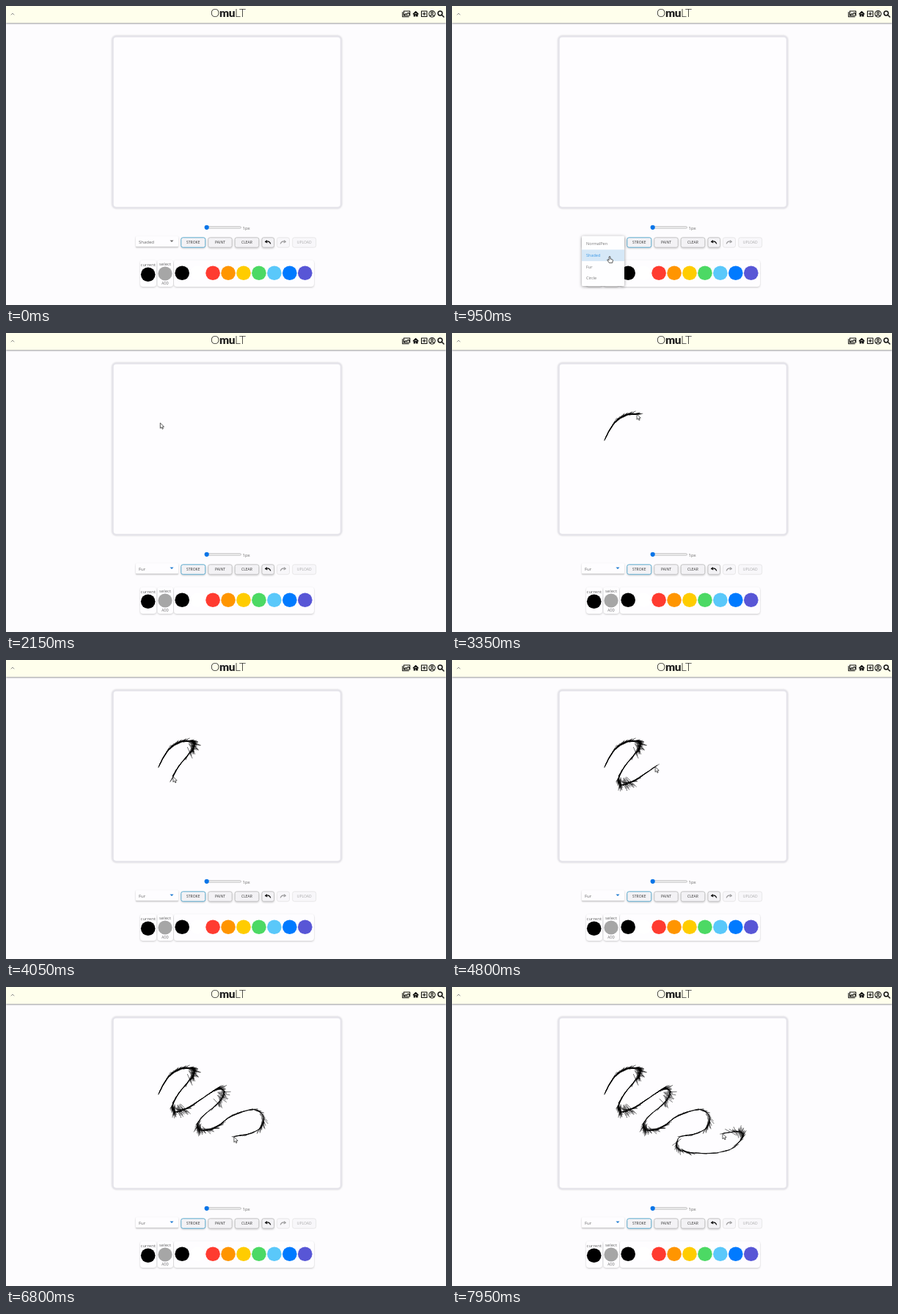
Write an HTML page that moves like this. It is 600 px wide and 409 px high and loops after 8000 ms.

```html
<!DOCTYPE html>
<html lang="en">
<head>
<meta charset="utf-8">
<title>Drawing board</title>
<style>
html, body { margin: 0; width: 100%; height: 100%; overflow: hidden; background: #fdfcfe; }
svg { display: block; width: 600px; height: 409px; font-family: "Open Sans", "Noto Sans", sans-serif; }
.lift { filter: drop-shadow(0 1px 1px #0003); }
.menu { filter: drop-shadow(0 1.5px 2px #0006); }
.label { font-size: 5px; text-anchor: middle; fill: #333; }
.off { opacity: .4; }
.icon { fill: none; stroke: #111; stroke-width: 1.1; stroke-linejoin: round; stroke-linecap: round; }
.logo { font: 300 15.5px Lato, Inter, sans-serif; fill: #222; }
.logo tspan { font-weight: 900; }
.item { font-size: 5.5px; fill: #777; }
.small { font-size: 6px; fill: #666; }
</style>
</head>
<body>
<svg viewBox="0 0 600 409">
  <rect width="600" height="409" fill="#fdfcfe"/>

  <g style="filter: drop-shadow(0 1px 1px #0006)"><rect width="600" height="23" fill="#ffffec"/></g>
  <path class="icon" style="stroke: #777; stroke-width: .8" d="M7 12l2-2 2 2"/>
  <text class="logo" x="303" y="15" text-anchor="middle" textLength="48">O<tspan>mu</tspan>LT</text>
  <g class="icon">
    <path d="M542.5 7h8.200v6h-8.200zM540.700 8.500v6.300h8.500M543.300 12.300l2-2 1.200 1 2-2.200 2 2.500"/>
    <path d="M555.200 10.800l3.500-3.300 3.500 3.300M556.300 10.500v3.500h1.500v-2h1.800v2h1.500v-3.500l-2.400-2.200z" fill="#111"/>
    <path d="M566.500 7h7.500v7.500h-7.500zM570.250 8.800v3.900M568.300 10.750h3.900"/>
    <circle cx="581" cy="10.800" r="4.200"/><circle cx="581" cy="9.600" r="1.400"/>
    <path d="M578.300 13.500q2.700-2.500 5.400 0"/>
    <g stroke-width="1.500"><circle cx="592" cy="10" r="2.900"/><path d="M594.300 12.300l2.700 2.700"/></g>
  </g>

  <rect x="145.500" y="41.500" width="311.500" height="234.500" rx="5" fill="#fefdff" stroke="#e5e4ea" stroke-width="2.500" style="filter: drop-shadow(0 0 1px #0002)"/>

  <rect x="272" y="301.600" width="48.500" height="2.600" rx="1.300" fill="#efefef" stroke="#aaa" stroke-width=".6"/>
  <circle cx="273.700" cy="302.800" r="3.100" fill="#0875e8"/>
  <text class="small" x="322.500" y="305.500">1px</text>

  <g class="lift"><rect x="177" y="315" width="58" height="14.500" rx="1.500" fill="#fefdff"/></g>
  <path d="M177 329.700h58" stroke="#aaa" stroke-width=".5"/>
  <text id="choice" class="small" x="181" y="325" fill="#777"></text>
  <path id="arrow" d="M223.500 320.500h5l-2.500 2.500z"/>
  <g id="buttons"></g>
  <g class="icon" stroke-width="1">
    <path id="undo" d="M355.500 320.800l-2 1.700 2.500 1.200M353.700 322.500q5-2 7 2.500"/>
    <path class="off" d="M379.500 320.800l2 1.700-2.500 1.200M381.300 322.500q-5-2-7 2.500"/>
  </g>

  <g id="cards" class="lift" fill="#fefdff"></g>
  <g class="small" text-anchor="middle">
    <text x="193.800" y="355.500">current</text>
    <text x="217" y="354.500">select</text>
    <text x="217" y="380.700" font-size="4.500" style="font-size: 4.500px">ADD</text>
  </g>
  <g id="swatches"></g>

  <path id="fur" fill="none" stroke="#000" stroke-width=".55"/>
  <path id="ink" fill="none" stroke="#000" stroke-width=".9" stroke-linejoin="round"/>

  <g id="menu" class="menu">
    <rect x="177" y="314.500" width="58" height="68.500" rx="1.500" fill="#fefeff"/>
    <rect id="hover" x="177" width="58" height="15.600" fill="#d6e8f7"/>
    <g id="items"></g>
  </g>

  <g id="cursor" fill="#fff" stroke="#222" stroke-width=".75" stroke-linejoin="round">
    <path id="pointer" d="M0 0v7.300l1.700-1.500 1.200 2.600 1.200-.6-1.100-2.400 2.200-.2z"/>
    <path id="hand" d="M-.9 .5q.9-1.200 1.800 0v3l2.600.6q1 .4.900 1.500l-.7 3.200h-4.300l-2.600-3.600q-.2-1.200 1-.8l1.300 1z"/>
  </g>
</svg>
<script>
const LOOP = 8000, DRAW_START = 2600;
const $ = id => document.getElementById(id);
const clamp = v => Math.min(1, Math.max(0, v));
const smooth = v => v * v * (3 - 2 * v);

function add(parent, tag, attrs, text = "") {
  const el = document.createElementNS("http://www.w3.org/2000/svg", tag);
  for (const key in attrs) el.setAttribute(key, attrs[key]);
  el.textContent = text;
  return $(parent).appendChild(el);
}

// Controls
[["STROKE", 238.8, 33], ["PAINT", 275.8, 32.4], ["CLEAR", 312.2, 32.6], ["", 349, 16.6],
 ["", 369.5, 17, "off"], ["UPLOAD", 390.7, 32, "off"]].forEach(([name, x, width, state = ""], i) => {
  add("buttons", "rect", { x, y: 316.8, width, height: 13.4, rx: 2.5, fill: "#f3f2f5",
    stroke: i ? "#bbb" : "#3a9cc8", "stroke-width": .8, class: state || "lift" });
  add("buttons", "text", { x: x + width / 2, y: 325.3, class: "label " + state }, name);
});
[[183, 22], [206.5, 21.5], [229, 191]].forEach(([x, width]) =>
  add("cards", "rect", { x, y: 347.5, width, height: 36.5, rx: 4 }));
const swatch = (cx, cy, r, fill) => add("swatches", "circle", { cx, cy, r, fill });
swatch(193.700, 367.2, 9.8, "#000");
swatch(217, 366, 9.6, "#a6a6a6");
["#000", "#fff", "#ff3b30", "#ff9500", "#ffcc00", "#4cd964", "#5ac8fa", "#007aff", "#5856d6"]
  .forEach((fill, i) => swatch(240.200 + i * 20.95, 365.2, 9.8, fill));
const items = ["NormalPen", "Shaded", "Fur", "Circle"].map((name, i) =>
  add("items", "text", { x: 183, y: 327.3 + i * 15.6, class: "item" }, name));
items[1].style.fill = "#3b98e6";

// Pen route: each section runs until its time through evenly timed points
const sections = [
  [3350, "212,138 220,125 229,116 240,111.500 252,111"],
  [4250, "257,114 254,123 243,136 232,151 227,163 229,170"],
  [4800, "237,170 250,164 264,155 277,146"],
  [5130, "290,138.500 297.500,144"],
  [5950, "291,157 276,170 264,182 261,190 264,195.500 273,196 284,193 292,188"],
  [6800, "303,179 316,173 332,168 344,169 351,178 350,188 341,197 327,202 311,205"],
  [7650, "306,215 309,222 323,226 345,227.500 366,226 382,221 392,211 397,204"],
  [7950, "394,198.500 384,198 369,200.500"]
];
const route = [{ t: DRAW_START, x: 208, y: 147 }];
for (const [end, list] of sections) {
  const points = list.split(" "), start = route[route.length - 1].t;
  points.forEach((p, i) => {
    const [x, y] = p.split(",").map(Number);
    route.push({ t: start + (end - start) * (i + 1) / points.length, x, y });
  });
}

function penAt(t) {
  const last = route.length - 1;
  let i = 0;
  while (i < last - 1 && route[i + 1].t < t) i++;
  const a = route[Math.max(0, i - 1)], b = route[i], c = route[i + 1], d = route[Math.min(last, i + 2)];
  const u = clamp((t - b.t) / (c.t - b.t));
  const spline = k => b[k] + .5 * u * (c[k] - a[k] + u * (2 * a[k] - 5 * b[k] + 4 * c[k] - d[k]
    + u * (3 * (b[k] - c[k]) + d[k] - a[k])));
  return { x: spline("x"), y: spline("y") };
}

// Fur brush: each new point throws hairs along the lines to its recent neighbours
let seed = 7;
const random = () => (seed = seed * 16807 % 2147483647) / 2147483647;
const STEP = 25, REACH = 20;
const samples = [], hairs = [];
for (let t = DRAW_START; t <= 7950; t += STEP) {
  const p = penAt(t);
  p.x += (random() - .5) * .6;
  p.y += (random() - .5) * .6;
  let tuft = "";
  for (const q of samples) {
    const dx = (q.x - p.x) / 2, dy = (q.y - p.y) / 2;
    const near = 4 * (dx * dx + dy * dy) / (REACH * REACH);
    if (near < 1 && random() > .45 + near * .55)
      tuft += `M${(p.x + dx).toFixed(1)} ${(p.y + dy).toFixed(1)}L${(p.x - dx).toFixed(1)} ${(p.y - dy).toFixed(1)}`;
  }
  samples.push(p);
  hairs.push(tuft);
}

// Pointer travel before drawing: time, x, y
const travel = [[150, 236, 409], [550, 217, 324], [700, 216, 325], [900, 215, 342.5], [1020, 215, 342.5],
  [1220, 207, 356], [1380, 207, 356], [1800, 214, 104], [2150, 210.3, 123], [2600, 208, 147]];
function cursorAt(t) {
  if (t >= DRAW_START) return penAt(t);
  const i = Math.max(1, travel.findIndex(k => k[0] >= t));
  const [t0, x0, y0] = travel[i - 1], [t1, x1, y1] = travel[i];
  const u = smooth(clamp((t - t0) / (t1 - t0)));
  return { x: x0 + (x1 - x0) * u, y: y0 + (y1 - y0) * u };
}

const show = (id, on) => $(id).style.display = on ? "" : "none";

function render(t) {
  const { x, y } = cursorAt(t);
  const overControl = t > 500 && t < 1440;
  $("cursor").setAttribute("transform", `translate(${x.toFixed(2)} ${y.toFixed(2)})`);
  show("cursor", t > 150);
  show("hand", overControl);
  show("pointer", !overControl);

  const open = clamp((t - 650) / 120), close = clamp((t - 1350) / 100);
  show("menu", open > 0 && close < 1);
  $("menu").style.opacity = open * (1 - close);
  $("menu").setAttribute("transform", `translate(0 ${314 * (1 - open) * .2}) scale(1 ${.8 + .2 * open})`);
  $("hover").setAttribute("y", y > 349 && t > 1000 ? 348.9 : 333.3);
  $("choice").textContent = t < 1350 ? "Shaded" : "Fur";
  $("arrow").setAttribute("fill", t < 620 ? "#666" : "#1878d0");

  const count = t < DRAW_START ? 0 : Math.floor((t - DRAW_START) / STEP) + 1;
  $("fur").setAttribute("d", hairs.slice(0, count).join(""));
  $("ink").setAttribute("d", count
    ? "M" + samples.slice(0, count).map(p => p.x.toFixed(1) + " " + p.y.toFixed(1)).join("L") : "");
}

const start = performance.now();
function frame() {
  render((performance.now() - start) % LOOP);
  requestAnimationFrame(frame);
}
frame();
</script>
</body>
</html>
```
